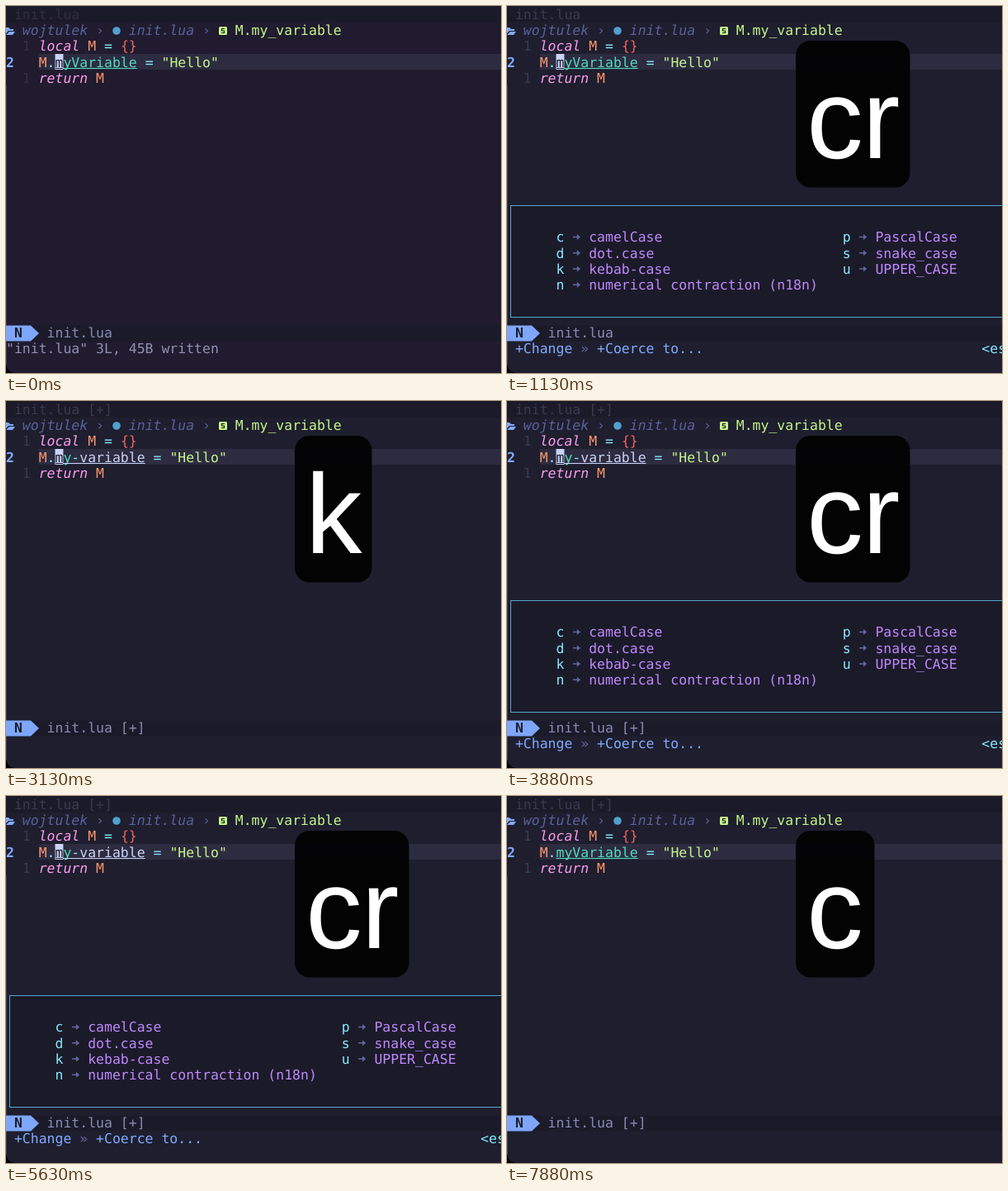
An HTML page for the animation above (8 s loop, 600 by 444 pixels).

```html
<!DOCTYPE html>
<html lang="en">
<head>
<meta charset="utf-8">
<title>Case coercion in an editor</title>
<style>
  html, body { margin: 0; width: 100%; height: 100%; overflow: hidden; background: #1e1e2e; }
  svg { display: block; width: 600px; height: 444px; }
  text { font: 16.48px "DejaVu Sans Mono", monospace; white-space: pre; text-rendering: geometricPrecision; }
  .it { font-style: italic; }
  .b { font-weight: bold; }
  .key { font: 137px "Liberation Sans", Arial, sans-serif; fill: #fff; }
</style>
</head>
<body>
<svg id="stage" viewBox="0 0 600 444" xmlns="http://www.w3.org/2000/svg"></svg>
<script>
const LOOP = 8000, CELL = 9.92, ROW = 19.25;
const C = {
  bg: '#1e1e2e', bar: '#1b1a29', line: '#2d2b40', faint: '#3a3a50', crumb: '#5a619b',
  dim: '#6066a2', grey: '#858bb4', blue: '#82aaff', cyan: '#86e9fc', green: '#c5f58a',
  teal: '#4fdcba', pink: '#fc9ced', orange: '#ff966c', red: '#f4635f', violet: '#be88fc',
  pale: '#c8d3f5', border: '#56a5cb'
};
const stage = document.getElementById('stage');

function add(tag, attrs, parent = stage) {
  const el = document.createElementNS('http://www.w3.org/2000/svg', tag);
  for (const k in attrs) el.setAttribute(k, attrs[k]);
  parent.appendChild(el);
  return el;
}
const group = (parent) => add('g', {}, parent);
const rect = (x, y, width, height, fill, parent, more) =>
  add('rect', { x, y, width, height, fill, ...more }, parent);
const show = (el, on) => { el.style.display = on ? '' : 'none'; };

// Text placed on the terminal grid.
function write(col, row, str, fill, parent, cls = '') {
  const el = add('text', { x: col * CELL, y: 15.8 + row * ROW, fill, class: cls }, parent);
  el.textContent = str;
  return el;
}

const back = rect(0, 0, 600, 444, C.bg);
rect(0, 0, 600, 20, C.bar);
rect(4 * CELL, 58, 600, 19, C.line);
rect(0, 386.5, 600, 19, C.bar);

// Window edge
rect(0, 96, 1, 338, '#3b394b');
add('path', { d: 'M0 433Q1 443 11 444H0Z', fill: '#000' });

const title = write(1, 0, '', C.faint);

// Breadcrumbs
add('path', { d: 'M0 26H3L5 28H9V30H3L0 33ZM4 31H11L8 35H0Z', fill: C.blue });
write(2, 1, 'wojtulek', C.crumb, stage, 'it');
write(11, 1, '›', C.crumb);
add('circle', { cx: 134, cy: 30, r: 4.8, fill: '#51a0cf' });
write(15, 1, 'init.lua', C.crumb, stage, 'it');
write(24, 1, '›', C.crumb);
rect(258, 25, 10, 10, C.green, stage, { rx: 1.5 });
add('path', { d: 'M265 27.5H261.5V30H264.5V32.5H261', fill: 'none', stroke: C.bg, 'stroke-width': 1.2 });
write(28, 1, 'M.my_variable', C.green);

// Code
const numbers = [write(2, 2, '1', C.faint), write(2, 4, '1', C.faint)];
write(0, 3, '2', C.blue, stage, 'b');
write(4, 2, 'local', C.pink, stage, 'it');
write(10, 2, 'M', C.orange);
write(12, 2, '=', C.cyan);
write(14, 2, '{}', C.red);
write(4, 4, 'return', C.pink, stage, 'it');
write(11, 4, 'M', C.orange);
write(4, 3, 'M', C.orange);
write(5, 3, '.', C.cyan);
write(6, 3, 'my', C.teal);

function variable(tail, count, tailColor, lineColor) {
  const g = group();
  rect(6 * CELL, 75, count * CELL, 1, lineColor, g);
  write(8, 3, tail, tailColor, g);
  write(7 + count, 3, '=', C.cyan, g);
  write(9 + count, 3, '"Hello"', C.green, g);
  return g;
}
const camel = variable('Variable', 10, C.teal, C.teal);
const kebab = variable(' variable', 11, C.pale, C.pale);
write(8, 3, '-', C.cyan, kebab);

const cursor = group();
rect(6 * CELL, 58, CELL, 19, C.pale, cursor);
write(6, 3, 'm', C.bg, cursor);
rect(6 * CELL + 0.5, 75, CELL - 1, 1, C.bg, cursor);

// Status line
add('path', { d: 'M0 386.5H30L40 396L30 405.5H0Z', fill: '#7ea6fb' });
write(1, 20, 'N', '#1b1d2b', stage, 'b');
const status = write(5, 20, '', C.grey);
const message = write(0, 21, '"init.lua" 3L, 45B written', '#908fb2');

// Key hints
const panel = group();
rect(4.5, 241.5, 610, 135, C.bar, panel, { stroke: C.border });
function hint(col, row, key, label) {
  const x = (col + 2) * CELL, y = 10 + row * ROW;
  write(col, row, key, C.cyan, panel);
  add('path', {
    d: `M${x + 0.5} ${y - 0.8}h5v-2.7l4.2 3.5l-4.2 3.5v-2.7h-5z`, fill: C.dim
  }, panel);
  write(col + 4, row, label, C.violet, panel);
}
[['c', 'camelCase'], ['d', 'dot.case'], ['k', 'kebab-case'], ['n', 'numerical contraction (n18n)']]
  .forEach(([key, label], i) => hint(6, 14 + i, key, label));
[['p', 'PascalCase'], ['s', 'snake_case'], ['u', 'UPPER_CASE']]
  .forEach(([key, label], i) => hint(41, 14 + i, key, label));
write(1, 21, '+Change', C.blue, panel);
write(9, 21, '»', C.dim, panel);
write(11, 21, '+Coerce to...', C.blue, panel);
write(58, 21, '<esc>', C.cyan, panel);

// Pressed keys
function keycap(width, letters) {
  const g = group();
  rect(350, 42, width, 177.5, '#000', g, { rx: 18, 'fill-opacity': 0.9 });
  for (const [ch, x] of letters) {
    add('text', { x, y: 184, class: 'key' }, g).textContent = ch;
  }
  return g;
}
const caps = {
  c: keycap(95.5, [['c', 363.2]]),
  cr: keycap(138.5, [['c', 363.2], ['r', 430.8]]),
  k: keycap(93.5, [['k', 363]])
};

// Each entry: start time, pressed keys, hints open.
const steps = [
  [0, '', false], [130, 'c', false], [250, 'cr', true], [2130, 'k', false],
  [3630, 'c', false], [3880, 'cr', true], [5750, '', true], [6380, 'c', false]
];
const within = (t, a, b) => t >= a && t < b;

function draw(t) {
  const [, keys, open] = steps.filter(s => s[0] <= t).pop();
  const edited = t >= 2130;
  const isKebab = within(t, 2130, 6380);
  const name = 'init.lua' + (edited ? ' [+]' : '');
  const first = t < 130;

  back.setAttribute('fill', first ? '#201b2e' : C.bg);
  title.setAttribute('fill', first ? '#332e40' : C.faint);
  numbers.forEach(n => n.setAttribute('fill', first ? '#332e40' : C.faint));
  title.textContent = status.textContent = name;
  show(message, t < 250);
  show(panel, open);
  show(kebab, isKebab);
  show(camel, !isKebab);
  show(cursor, !(within(t, 2630, 3130) || within(t, 6880, 7380) || t >= 7880));
  for (const k in caps) show(caps[k], k === keys);
}

const start = performance.now();
function tick() {
  draw((performance.now() - start) % LOOP);
  requestAnimationFrame(tick);
}
draw(0);
requestAnimationFrame(tick);
</script>
</body>
</html>
```
